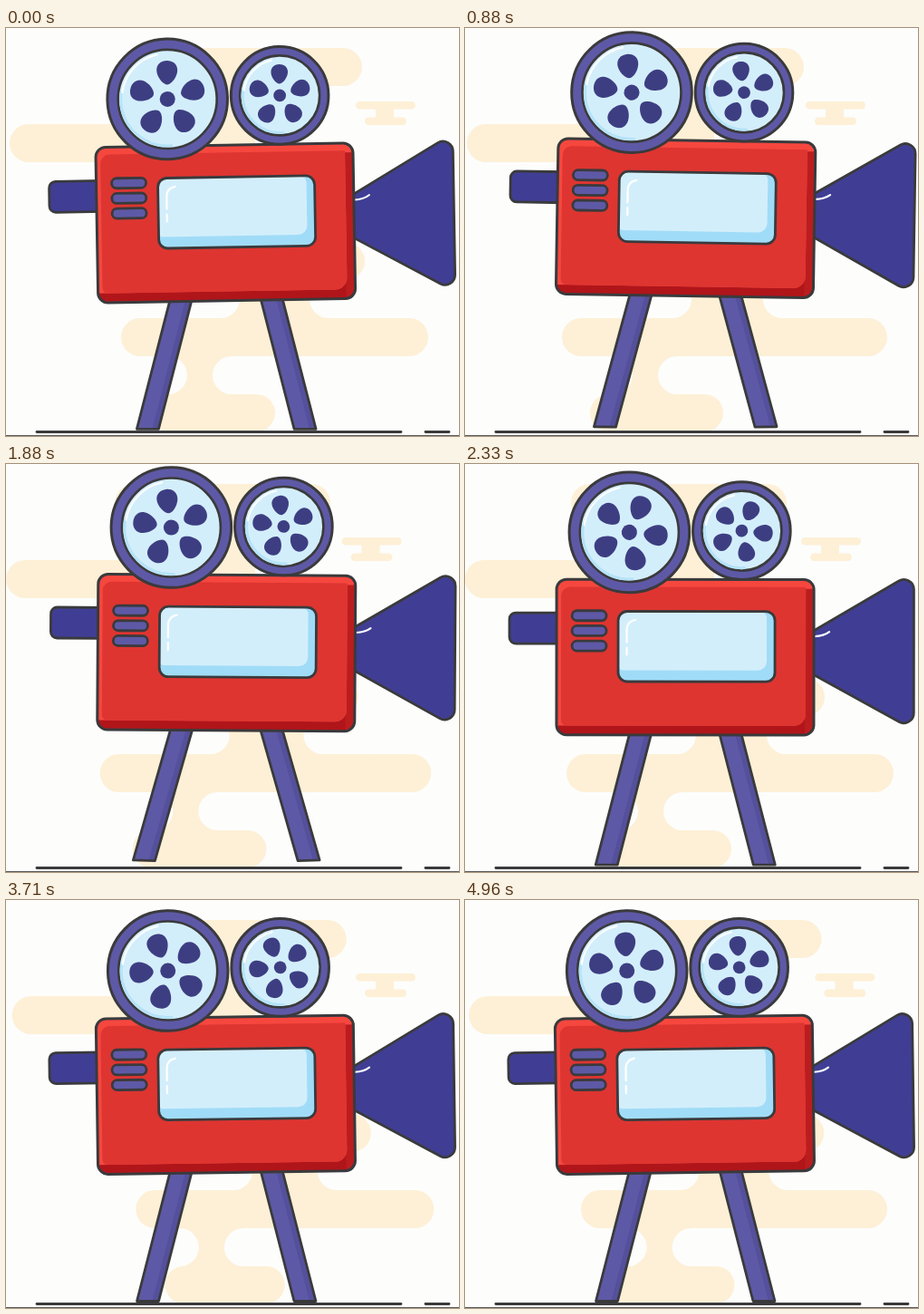
Animation, 500 px wide and 450 px high, one loop 5000 ms. Source, as an HTML page with a canvas:

```html
<!DOCTYPE html>
<html lang="en">
<head>
<meta charset="utf-8">
<title>Film camera</title>
<style>
html, body { margin: 0; width: 100%; height: 100%; overflow: hidden; background: #fdfdfc; }
canvas { display: block; }
</style>
</head>
<body>
<canvas id="stage" width="500" height="450"></canvas>
<script>
const ctx = document.getElementById('stage').getContext('2d');
const TAU = Math.PI * 2;
const LOOP = 5;
const BOUNCE = 1.25;

const PAPER = '#fdfdfc', CLOUD = '#fdf0d6', INK = '#3a3a3c';
const NAVY = '#403e94', PURPLE = '#5e59a6', PURPLE_DARK = '#55509c';
const GLASS = '#d3eefb', GLASS_DARK = '#a0dcf7', PETAL = '#3d3e82';
const RED = '#de3531', RED_LIGHT = '#f6473f', RED_DARK = '#b0151a', RED_SIDE = '#bb1d1f';

// Smooth periodic curve through a few positions
const KEYS = [0, 0.88, 1.46, 2.33, 3.08, 4.33];
function drift(t, vals) {
  const n = KEYS.length;
  const at = i => KEYS[(i + n) % n] + Math.floor(i / n) * LOOP;
  const val = i => vals[(i + n) % n];
  const slope = i => (val(i + 1) - val(i - 1)) / (at(i + 1) - at(i - 1));
  let i = n - 1;
  while (KEYS[i] > t) i--;
  const d = at(i + 1) - at(i), u = (t - at(i)) / d;
  const u2 = u * u, u3 = u2 * u;
  return val(i) * (2 * u3 - 3 * u2 + 1) + slope(i) * d * (u3 - 2 * u2 + u) +
    val(i + 1) * (3 * u2 - 2 * u3) + slope(i + 1) * d * (u3 - u2);
}

function smooth(a, b, x) {
  const u = Math.min(1, Math.max(0, (x - a) / (b - a)));
  return u * u * (3 - 2 * u);
}

function box(x1, y1, x2, y2, r, fill, line) {
  ctx.beginPath();
  ctx.roundRect(x1, y1, x2 - x1, y2 - y1, r);
  paint(fill, line);
}

function paint(fill, line) {
  if (fill) { ctx.fillStyle = fill; ctx.fill(); }
  if (line) { ctx.strokeStyle = INK; ctx.lineWidth = line; ctx.stroke(); }
}

function disc(x, y, r, fill, line) {
  ctx.beginPath();
  ctx.arc(x, y, r, 0, TAU);
  paint(fill, line);
}

function stroke(color, width, path) {
  ctx.beginPath();
  path();
  ctx.strokeStyle = color;
  ctx.lineWidth = width;
  ctx.stroke();
}

function segment(x1, y1, x2, y2, color, width) {
  stroke(color, width, () => { ctx.moveTo(x1, y1); ctx.lineTo(x2, y2); });
}

function pill(x1, x2, y1, y2, fill) {
  box(x1, y1, x2, y2, (y2 - y1) / 2, fill);
}

function block(x1, x2, y1, y2) {
  ctx.fillStyle = CLOUD;
  ctx.fillRect(x1, y1, x2 - x1, y2 - y1);
}

function clouds(t) {
  const top = drift(t, [393, 374, 363, 355, 358, 393]);
  const left = drift(t, [4, 2, 1, 0, 4, 8]);
  const small = drift(t, [386, 376, 372, 371, 381, 389]);
  const midL = drift(t, [127, 107, 100, 112, 137, 143]);
  const midR = drift(t, [466, 466, 466, 473, 477, 467]);
  const gapL = drift(t, [258, 250, 242, 255, 270, 270]);
  const gapR = drift(t, [335, 329, 326, 333, 345, 340]);
  const bump = drift(t, [396, 385, 382, 397, 406, 398]);
  const neck = drift(t, [228, 213, 209, 219, 238, 239]);
  const lowL = drift(t, [158, 138, 134, 149, 170, 175]);
  const lowR = drift(t, [297, 285, 283, 294, 307, 305]);

  pill(top - 238, top, 22, 64, CLOUD);
  pill(left, 250, 106, 148, CLOUD);
  block(215, 275, 60, 278);

  pill(small, small + 66, 81, 89.5, CLOUD);
  block(small + 22, small + 42, 89, 99);
  pill(small + 10, small + 56, 98.5, 107, CLOUD);

  pill(230, bump, 236, 278, CLOUD);
  block(gapL - 21, gapR + 21, 277, 321);
  pill(gapL - 90, gapL, 278, 320, PAPER);
  pill(gapR, gapR + 90, 278, 320, PAPER);
  pill(midL, midR, 320, 362, CLOUD);

  block(neck - 49, neck + 21, 361, 405);
  pill(neck - 120, neck - 28, 362, 404, PAPER);
  pill(neck, neck + 100, 362, 404, PAPER);
  pill(lowL, lowR, 404, 445, CLOUD);
}

// side: -1 for the left leg, 1 for the right one
function leg(side, lift) {
  ctx.save();
  ctx.translate(side < 0 ? 195.5 : 291, 290.5 + lift * 0.85);
  ctx.rotate(side * lift / 5 * 0.028);
  const foot = side * 39;
  const quad = (a, b) => {
    ctx.beginPath();
    ctx.moveTo(a, 0);
    ctx.lineTo(b, 0);
    ctx.lineTo(b + foot, 152);
    ctx.lineTo(a + foot, 152);
    ctx.closePath();
  };
  quad(-12, 12);
  paint(PURPLE);
  quad(5, 12);
  paint(PURPLE_DARK);
  quad(-12, 12);
  paint(null, 2.8);
  ctx.restore();
}

function reel(x, y, outer, inner, size, spin) {
  disc(x, y, outer, PURPLE, 3);
  disc(x, y, inner, GLASS, 2.6);
  stroke('#b5e3f8', 3, () => ctx.arc(x, y, inner - 3, 1.5, 3.3));
  stroke('#ffffff', 2, () => ctx.arc(x, y, inner - 4, 3.3, 4.5));
  ctx.save();
  ctx.translate(x, y);
  ctx.scale(size, size);
  ctx.rotate(spin);
  for (let i = 0; i < 5; i++) {
    ctx.beginPath();
    ctx.moveTo(0, -16);
    ctx.bezierCurveTo(-5, -16, -11.5, -25, -11.5, -32);
    ctx.bezierCurveTo(-11.5, -39, -6, -42.5, 0, -42.5);
    ctx.bezierCurveTo(6, -42.5, 11.5, -39, 11.5, -32);
    ctx.bezierCurveTo(11.5, -25, 5, -16, 0, -16);
    paint(PETAL);
    ctx.rotate(TAU / 5);
  }
  disc(0, 0, 8.5, PETAL);
  ctx.restore();
}

function cone() {
  ctx.beginPath();
  ctx.moveTo(380, 187);
  ctx.arcTo(495.3, 119.5, 495.3, 200, 11);
  ctx.arcTo(495.3, 293.5, 380, 230, 11);
  ctx.lineTo(380, 230);
  ctx.closePath();
  paint(NAVY, 2.8);
  stroke('#ffffff', 2.2, () => {
    ctx.moveTo(386, 190.5);
    ctx.quadraticCurveTo(396, 190, 402, 185.5);
  });
}

function body() {
  ctx.save();
  ctx.beginPath();
  ctx.roundRect(101, 127.8, 284, 171.5, 11);
  ctx.clip();
  ctx.fillStyle = RED_DARK;
  ctx.fillRect(95, 120, 300, 190);
  box(95, 120, 395, 150, 0, RED_LIGHT);
  box(375, 138, 395, 310, 0, RED_SIDE);
  box(95, 120, 376, 289, [0, 0, 13, 0], RED_LIGHT);
  box(106, 136, 376, 289, [10, 0, 13, 6], RED);
  ctx.restore();
  box(101, 127.8, 385, 299.3, 11, null, 3);

  for (let i = 0; i < 3; i++) {
    const y = 162.3 + i * 16.7;
    box(118, y, 156, y + 11, 5.5, PURPLE, 2.8);
  }

  box(169, 163, 342, 240.5, 10, GLASS_DARK);
  box(170, 164, 333, 228, [9, 6, 10, 4], GLASS);
  box(169, 163, 342, 240.5, 10, null, 2.8);
  stroke('#ffffff', 2.2, () => {
    ctx.moveTo(178.5, 197);
    ctx.lineTo(178.5, 183);
    ctx.quadraticCurveTo(179, 174, 188, 172.5);
  });
  segment(178.5, 203, 178.5, 211, '#ffffff', 2.2);
}

function draw(t) {
  const phase = t / BOUNCE % 1;
  const lift = 2.5 * Math.cos(TAU * (phase + 0.05)) - 2.5;
  // Tilt back, forward, then back again across the cycle seam
  const p = phase < 0.05 ? phase + 1 : phase;
  const sway = 1.85 * (smooth(0.2, 0.66, p) - smooth(0.72, 1.04, p)) - 1;
  const spin = t / LOOP * TAU;

  ctx.fillStyle = PAPER;
  ctx.fillRect(0, 0, 500, 450);
  ctx.lineCap = ctx.lineJoin = 'round';
  clouds(t);

  segment(34, 445.5, 436, 445.5, INK, 2.8);
  segment(463, 445.5, 489, 445.5, INK, 2.8);
  ctx.fillStyle = '#5a5a5a';
  ctx.fillRect(0, 449, 500, 1);

  leg(-1, lift);
  leg(1, lift);

  ctx.save();
  ctx.translate(335, 255 + lift);
  ctx.rotate(sway * 0.0183);
  ctx.translate(-335, -255);
  box(49, 164.7, 115, 198.7, 7, NAVY, 2.8);
  cone();
  body();
  reel(305.2, 74, 53.8, 44, 0.81, spin);
  reel(181.2, 75.9, 66.3, 54.5, 1, spin);
  ctx.restore();
}

function frame() {
  draw(performance.now() / 1000 % LOOP);
  requestAnimationFrame(frame);
}
frame();
</script>
</body>
</html>
```
